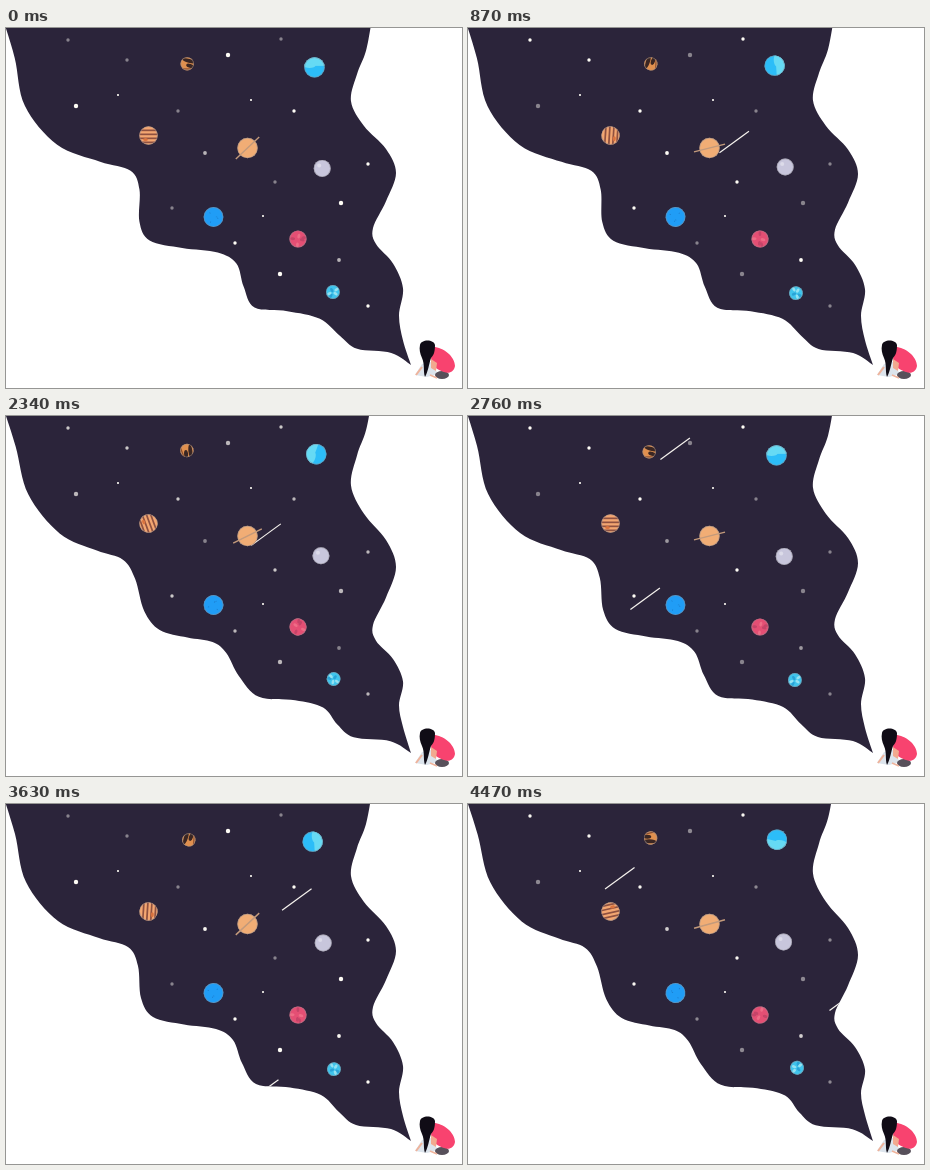
These frames come from a looping animation (456 px wide and 360 px high, 4.5 s). An HTML page with a canvas:

```html
<!DOCTYPE html>
<html lang="en">
<head>
<meta charset="utf-8">
<title>Night sky</title>
<style>
html, body { margin: 0; width: 100%; height: 100%; overflow: hidden; background: #fff; }
canvas { display: block; }
</style>
</head>
<body>
<canvas id="stage" width="456" height="360"></canvas>
<script>
const ctx = document.getElementById('stage').getContext('2d');
const { sin, cos, max, floor, PI } = Math;
const TAU = PI * 2, LOOP = 4500, STEP = 30;
const SPIN = 2760, PULSE = 1840, SURGE = 2130, SHOWER = 1440;

// Key points of the sky's edges; both end at the tip.
const leftEdge = [
  [-4, -12], [9, 30], [20, 78], [52, 117], [93, 134], [122, 143], [132, 162],
  [135, 194], [147, 213], [178, 220.5], [210, 225], [227, 236], [236, 259],
  [250, 280], [284, 283.5], [315, 291], [333, 308], [350, 321], [385, 325], [405, 337]];
const rightEdge = [
  [405, 337], [397, 312], [393, 288], [397, 262], [387, 238], [370, 219], [367, 203],
  [380, 176], [390, 147], [380, 122], [358, 98], [345, 72], [351, 44], [360, 20], [366, -12]];

// Stars in groups that twinkle together.
const bright = [[222, 27], [288, 83], [70, 78], [229, 215], [274, 246], [362, 136], [335, 175], [362, 278]];
const dim = [[62, 12], [121, 32], [275, 11], [172, 83], [269, 154], [166, 180]];
const slow = [[199, 125], [333, 232]];
const tiny = [[112, 67], [245, 72], [257, 188]];

// first start, x, y
const meteors = [[1200, 217, 25], [560, 315, 77], [50, 382, 191], [1200, 187, 175], [540, 286, 265]];

const random = n => {
  const v = sin(n * 12.9898) * 43758.5453;
  return v - floor(v);
};

// Rests near zero, swells briefly once per surge, and starts pulled back.
function sway(t) {
  const swell = t < 1245 ? 0 : ((1 + cos(TAU * (t - 2310) / SURGE)) / 2) ** 6;
  return swell - .5 * max(0, 1 - t / 1700);
}

function spline(p) {
  for (let i = 0; i < p.length - 1; i++) {
    const a = p[i - 1] || p[i], b = p[i], c = p[i + 1], d = p[i + 2] || c;
    ctx.bezierCurveTo(b[0] + (c[0] - a[0]) / 6, b[1] + (c[1] - a[1]) / 6,
      c[0] - (d[0] - b[0]) / 6, c[1] - (d[1] - b[1]) / 6, c[0], c[1]);
  }
}

function sky(t) {
  const s = sway(t), last = leftEdge.length - 1;
  const left = leftEdge.map(([x, y], i) =>
    [x + 7 * s * sin(PI * i / last) * cos(TAU * (i - 8) / 6), y + s * sin(PI * i / last)]);
  const right = rightEdge.map(([x, y], i) => [x, i ? y + 6 * s * sin((y - 100) / 64) : y]);
  ctx.beginPath();
  ctx.moveTo(...left[0]);
  spline(left);
  spline(right);
  ctx.closePath();
  ctx.fillStyle = '#2b243a';
  ctx.fill();
}

function oval(x, y, rx, ry, color, turn = 0) {
  ctx.fillStyle = color;
  ctx.beginPath();
  ctx.ellipse(x, y, rx, ry, turn, 0, TAU);
  ctx.fill();
}

function line(x1, y1, x2, y2, color, width) {
  ctx.strokeStyle = color;
  ctx.lineWidth = width;
  ctx.beginPath();
  ctx.moveTo(x1, y1);
  ctx.lineTo(x2, y2);
  ctx.stroke();
}

function shape(d, color) {
  ctx.fillStyle = color;
  ctx.fill(new Path2D(d));
}

function bar(y, h, color) {
  ctx.fillStyle = color;
  ctx.fillRect(-12, y, 24, h);
}

function blots(count, r, size, colors) {
  for (let i = 0; i < count; i++) {
    const a = TAU * (i + random(i + r)) / count, d = r * (.35 + .5 * random(i + 9));
    oval(d * cos(a), d * sin(a), size, size * .6, colors[i % colors.length], a);
  }
}

// A disc whose surface details turn with it and stay inside it.
function planet([x, y], r, color, turn, details) {
  ctx.save();
  ctx.translate(x, y);
  ctx.rotate(turn);
  oval(0, 0, r, r, color);
  ctx.beginPath();
  ctx.arc(0, 0, r, 0, TAU);
  ctx.clip();
  details();
  ctx.strokeStyle = 'rgba(140, 138, 144, .6)';
  ctx.lineWidth = 1.4;
  ctx.beginPath();
  ctx.arc(0, 0, r, 0, TAU);
  ctx.stroke();
  ctx.restore();
}

function starGroup(points, glow, radius) {
  ctx.globalAlpha = .72 + .28 * glow;
  points.forEach(([x, y], i) => oval(x, y, radius(i), radius(i), '#fffdf6'));
  ctx.globalAlpha = 1;
}

function drawStars(t) {
  const wave = cos(TAU * t / PULSE);
  starGroup(bright, wave, i => i % 2 ? 1.7 : 2.2);
  starGroup(dim, -wave, () => 1.7);
  starGroup(slow, -cos(TAU * (t - 2340) / 3000), () => 1.9);
  starGroup(tiny, 1, () => 1.1);
}

function drawMeteors(t) {
  for (const [start, x, y] of meteors) {
    const age = (t - start) % SHOWER;
    if (t < start || age >= 600) continue;
    const px = x - age * .205, py = y + age * .154;
    line(px, py, px + 29.5, py - 21.5, '#f6f3ee', 1.2);
  }
}

function drawPlanets(t) {
  const p = t % SPIN / SPIN;
  const a = TAU * (p - .09 * sin(PI * p));
  const orbit = (x, y, r, start, dir) =>
    [x + r * cos(start + dir * a), y + r * sin(start + dir * a)];

  planet(orbit(182, 35, 1.2, 2.36, -1), 6.7, '#e0904f', -a, () => {
    oval(2, -3, 7, 2, '#3a2623', .25);
    oval(3, 2, 4, 2, '#3a2623', .25);
    bar(4.5, 1.2, '#8c4d2c');
  });
  planet(orbit(308.5, 37.5, 1.9, PI / 2, 1), 10.2, '#2cbdf8', a, () => {
    bar(-11, 9.5, '#66daf4');
    oval(-5, -2, 6, 2.5, '#66daf4');
  });
  planet([142.5, 107.5], 9.2, '#f3a671', -a, () => {
    for (let y = -6; y < 8; y += 4) bar(y, 1.7, '#8f5140');
    oval(-3, 4, 2.4, 1.5, '#d9733f');
  });

  const tilt = (-28.5 - 14.5 * cos(TAU * t / PULSE)) * PI / 180;
  const rx = 16 * cos(tilt), ry = 16 * sin(tilt);
  planet([241.5, 120], 10.2, '#f1ad75', 0, () => {});
  line(241.5 - rx, 120 - ry, 241.5 + rx, 120 + ry, '#c39a7b', 1.4);

  planet(orbit(316, 139.2, 1.2, 1.4, -1), 8.5, '#c8c6dc', 0, () => oval(-3, -3, 2, 2, '#dcdbe9'));
  planet([207.5, 189], 9.9, '#209df6', a, () => blots(4, 7, .8, ['#1c7fd0']));
  planet([292, 211], 8.6, '#e44f74', a, () => blots(5, 7, 2.4, ['#c54468', '#ee6c86']));
  planet(orbit(328, 264, 1.1, PI, -1), 6.9, '#3fc4ec', -a, () => blots(5, 5, 2.3, ['#93e2f2', '#2aa3d6']));
}

function drawChild() {
  shape('M409 347L416 336L425 334L432 346L421 349Z', '#dce4ec');
  oval(436, 347, 7, 4, '#57505a');
  shape('M426 319C436 318 449 328 449 338C448 344 443 346 438 344C432 342 427 339 425 332Z', '#f8436f');
  shape('M425 331L431 335L430 343L425 340Z', '#f2a98f');
  line(416, 339, 410, 347, '#efb39b', 2);
  line(424, 347, 431, 350, '#efb39b', 1.6);
  shape('M414 317C415 311 428 311 429 317C429 323 428 327 425 330C423 336 422 344 419 349C417 343 419 337 416 330C414 326 413 321 414 317Z', '#100c16');
}

function draw(t) {
  ctx.fillStyle = '#fff';
  ctx.fillRect(0, 0, 456, 360);
  ctx.save();
  sky(t);
  ctx.clip();
  drawStars(t);
  drawMeteors(t);
  drawPlanets(t);
  ctx.restore();
  drawChild();
}

const begin = performance.now();
function tick() {
  const t = (performance.now() - begin) % LOOP;
  draw(floor(t / STEP) * STEP);
  requestAnimationFrame(tick);
}
tick();
</script>
</body>
</html>
```
